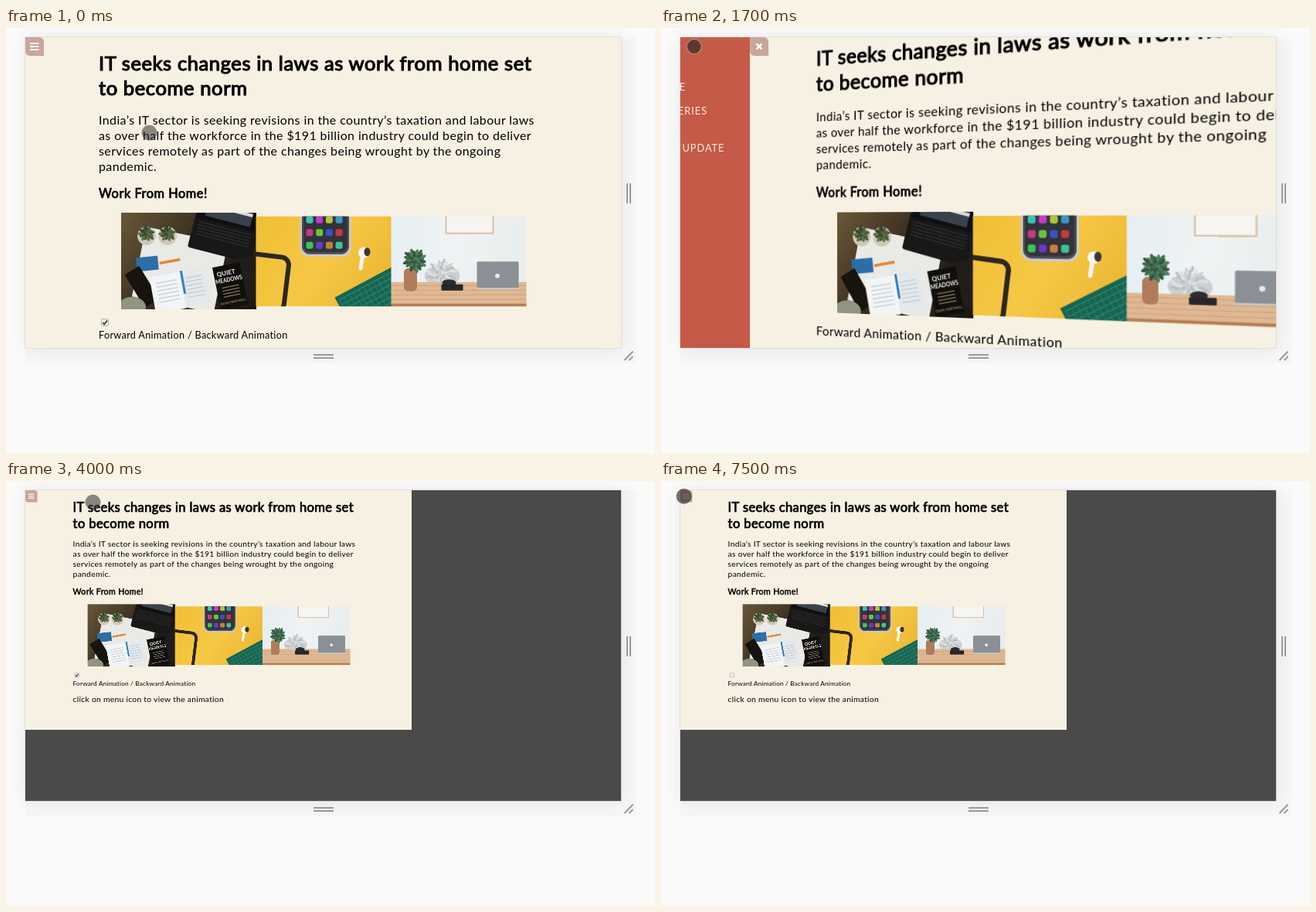
An HTML page with a canvas for the animation above (8 s loop, 840 by 550 pixels).

```html
<!DOCTYPE html>
<html lang="en">
<head>
<meta charset="utf-8">
<title>Page tilt menu</title>
<style>
html, body { margin: 0; width: 100%; height: 100%; overflow: hidden; background: #fafafa; }
body { font-family: Lato, sans-serif; color: #000; }
#stage { position: relative; width: 840px; height: 550px; overflow: hidden; background: #fafafa; }
#stage div, #stage p, #stage canvas, #stage svg { position: absolute; margin: 0; }
#tray { left: 25px; top: 12px; width: 791px; height: 422px; background: #f6f6f6; }
#view, #shade { left: 25px; top: 12px; width: 771px; height: 402px; overflow: hidden; }
#shade { box-shadow: 0 0 0 .6px #d4d4d4, 0 0 22px rgba(0,0,0,.08); }
#zoom { left: 0; top: 0; width: 771px; height: 478px; transform-origin: 0 0; perspective: 783px; perspective-origin: 50% 50%; }
#page { left: 0; top: 0; width: 771px; height: 478px; background: #f7f1e3; transform-origin: 0 50%; }
#page p { left: 95px; white-space: nowrap; letter-spacing: .024em; font-size: 16px; line-height: 20px; }
#page .bold { -webkit-text-stroke: .045em #000; }
#page .title { top: 17px; font-size: 25.6px; line-height: 32px; letter-spacing: .022em; }
#page .text { top: 97px; line-height: 19.9px; }
#page .sub { top: 192px; font-size: 16.4px; letter-spacing: .032em; }
#photos { left: 123.5px; top: 226.5px; width: 525px; height: 125px; }
#box { left: 97.5px; top: 364px; width: 8px; height: 8px; border: 1px solid #b4b4b4; border-radius: 2px; background: #e9eaec; }
#box svg, #btn svg { left: 0; top: 0; }
#menu { left: -157px; top: 0; width: 157px; height: 478px; background: #c45a47; color: #f8ece6; }
#menu p { left: 24px; font-size: 12.8px; line-height: 16px; letter-spacing: .95px; white-space: nowrap; }
#menu p + p { margin-top: 15.5px; }
#menu nav { position: absolute; top: 24px; }
#menu nav p { position: relative; }
#btn { left: 0; top: 0; width: 23.5px; height: 23.5px; background: #caa59a; border-radius: 0 6px 0 6px; }
#dot { left: -10px; top: -10px; width: 20px; height: 20px; box-sizing: border-box; border-radius: 50%; }
</style>
</head>
<body>
<div id="stage">
  <div id="tray"></div>
  <div id="shade"></div>
  <div id="view">
    <div id="zoom">
      <div id="page">
        <p class="title bold">IT seeks changes in laws as work from home set<br>to become norm</p>
        <p class="text">India’s IT sector is seeking revisions in the country’s taxation and labour laws<br>as over half the workforce in the $191 billion industry could begin to deliver<br>services remotely as part of the changes being wrought by the ongoing<br>pandemic.</p>
        <p class="sub bold">Work From Home!</p>
        <canvas id="photos" width="1050" height="250"></canvas>
        <div id="box"><svg width="8" height="8"><path id="tick" d="M1.2 4.2 3.2 6.4 7 1.4" fill="none" stroke="#333" stroke-width="1.7"/></svg></div>
        <p id="label">Forward Animation / Backward Animation</p>
        <p id="hint">click on menu icon to view the animation</p>
      </div>
      <div id="menu"><nav><p>HOME</p><p>OFFICE</p><p>GROCERIES<br>SHOP</p><p>NEWS UPDATE</p></nav></div>
      <div id="btn"><svg width="24" height="24" fill="none" stroke="#fff">
        <path id="bars" d="M6 8H17.5M6 12H17.5M6 16H17.5" stroke-width="1.8"/>
        <path id="cross" d="M8.4 8.4 15.4 15.4M15.4 8.4 8.4 15.4" stroke-width="2.4"/>
      </svg></div>
    </div>
  </div>
  <svg width="840" height="550" fill="none" stroke="#999" stroke-width="2">
    <path d="M804 201V227M808 201V227M398 423H424M398 427H424M800.5 430 811.5 418.5M806.5 430 811.5 425"/>
  </svg>
  <div id="dot"></div>
</div>
<script>
const $ = id => document.getElementById(id);
const g = $('photos').getContext('2d');
const photoW = 175, photoH = 116.5;

// run a drawing in a moved and turned frame
function at(x, y, turn, draw) {
  g.save();
  g.translate(x, y);
  g.rotate(turn);
  draw();
  g.restore();
}
function rect(color, x, y, w, h, r = 0) {
  g.fillStyle = color;
  g.beginPath();
  g.roundRect(x, y, w, h, r);
  g.fill();
}
// rectangle given by its centre
function slab(color, x, y, w, h, turn = 0, r = 0) {
  at(x, y, turn, () => rect(color, -w / 2, -h / 2, w, h, r));
}
function oval(color, x, y, rx, ry = rx, turn = 0) {
  g.fillStyle = color;
  g.beginPath();
  g.ellipse(x, y, rx, ry, turn, 0, 7);
  g.fill();
}
function fade(w, h, ...colors) {
  const f = g.createLinearGradient(0, 0, w, h);
  colors.forEach((c, i) => f.addColorStop(i / (colors.length - 1), c));
  return f;
}
function rows(color, n, x, y, w, step) {
  for (let i = 0; i < n; i++) rect(color, x, y + i * step, w, 1);
}
// tuft of leaves on a sunflower spiral
function tuft(x, y, n, size, spread, hue, sat, light) {
  for (let i = 0; i < n; i++) {
    const a = i * 2.4, r = spread * Math.sqrt(i / n);
    oval(`hsl(${hue},${sat}%,${light + i % 3 * 7}%)`, x + r * Math.cos(a), y + r * Math.sin(a), size, size / 2, a);
  }
}
function photo(x, y, h, draw) {
  g.save();
  g.beginPath();
  g.rect(x, y, photoW, h);
  g.clip();
  at(x, y, 0, draw);
  g.restore();
}

function desk() {
  rect(fade(photoW, 125, '#6a5838', '#33291c', '#1c1713'), 0, 0, photoW, 125);
  slab('#e9e9e6', 76, 74, 108, 92, .2);
  for (const x of [33, 60]) {
    oval('#cfc8b8', x, 30, 12);
    tuft(x, 27, 18, 4, 8, 90, 22, 22);
  }
  at(130, 33, .25, () => {
    rect('#181818', -40, -24, 84, 46, 3);
    rect('#0f1013', -38, -48, 84, 30);
    rect('#39424a', -28, -45, 60, 22);
    rect('#d8dce0', -28, -40, 60, 4);
    rows('#353535', 5, -34, -14, 70, 4);
  });
  slab('#2c6fa6', 34, 66, 28, 18, -.1);
  slab('#e8842c', 63, 63, 27, 3.5, -.18);
  slab('#17130f', 27, 96, 22, 50, -.55);
  oval('#8f9580', 14, 122, 18, 13);
  at(80, 99, -.18, () => {
    rect('#f2f4f5', -40, -23, 40, 48);
    rect('#e4e8eb', 0, -23, 32, 46);
    rows('#b9c5d1', 6, -33, -14, 27, 5);
    rows('#b9c5d1', 6, 5, -14, 22, 5);
  });
  slab('#2a83c4', 80, 90, 3, 30, -.18);
  slab('#211d1a', 160, 86, 30, 56, -.15);
  at(141, 94, -.2, () => {
    rect('#100f0e', -18, -27, 36, 56);
    g.fillStyle = '#f4f2ec';
    g.textAlign = 'center';
    g.font = 'bold 8px Lato, sans-serif';
    g.fillText('QUIET', -2, -14);
    g.fillText('MEADOWS', 0, -5, 35);
    rows('#a08c62', 4, -11, 1, 22, 4);
    g.font = 'bold 4px Lato, sans-serif';
    g.fillText('OLIVE HARTWELL', 0, 23);
  });
}

function gadgets() {
  rect(fade(photoW, photoH, '#f0bf35', '#f7c845', '#e7b330'), 0, 0, photoW, photoH);
  rect('#c9cbd0', 57, -20, 66, 72, 12);
  rect('#4b4c50', 59.5, -20, 61, 69, 10);
  rect('#33323a', 62, -20, 56, 66, 8);
  for (let i = 0; i < 12; i++) {
    const row = Math.floor(i / 4);
    rect(`hsl(${130 * (i - 7)},55%,50%)`, 65 + i % 4 * 12.7, row * 16.5, 9, 9, 2.4);
  }
  at(16, 82, .12, () => {
    g.strokeStyle = '#2a2622';
    g.lineWidth = 6;
    g.beginPath();
    g.roundRect(-38, -31, 62, 70, 10);
    g.stroke();
  });
  slab('#f6f4f0', 137, 57, 5, 26, .15, 2.5);
  oval('#f6f4f0', 139.5, 47, 7);
  oval('#3a3634', 144, 46, 4, 5.5);
  at(102, 105, -.49, () => {
    rect('#146652', 0, 0, 100, 60);
    rows('#3b8672', 8, 4, 5, 96, 7);
    for (let x = 4; x < 100; x += 7) rect('#3b8672', x, 5, .6, 55);
  });
}

function table() {
  rect(fade(photoW, 30, '#e6eff2', '#f0f3f4', '#e9edee'), 0, 0, photoW, photoH);
  rect('#d9c3a6', 70, -5, 63, 28);
  rect('#f6f5f2', 72, -5, 59, 26);
  oval('#cdd1d3', 66, 77, 23, 14);
  tuft(66, 76, 60, 3, 19, 200, 4, 74);
  rect('#dfb893', 0, 85, photoW, 32);
  rows('#d0a47c', 5, 0, 89, photoW, 6);
  rect('#b57f55', 0, 113, photoW, 4);
  rect('#b07c5c', 16.5, 67, 17, 30, 6);
  tuft(31, 57, 34, 4, 13, 140, 25, 26);
  oval('#2c2d30', 75, 86, 9, 4.5);
  rect('#26272a', 65, 88, 28, 8, 1);
  rect('#8b9096', 111, 58.5, 54, 35, 2);
  rect('#c9ccd0', 110, 92.5, 55, 2);
  oval('#e8eaec', 137.5, 77, 3);
}

function drawPhotos() {
  g.scale(2, 2);
  photo(0, 0, 125, desk);
  photo(174.5, 4.7, photoH, gadgets);
  photo(349.5, 4.7, photoH, table);
}

const clamp = u => Math.min(1, Math.max(0, u));
const smooth = u => u * u * (3 - 2 * u);

// CSS "ease" curve
function ease(x) {
  const bez = (s, a, b) => 3 * s * (1 - s) ** 2 * a + 3 * s * s * (1 - s) * b + s ** 3;
  let lo = 0, hi = 1;
  for (let i = 0; i < 24; i++) {
    const mid = (lo + hi) / 2;
    if (bez(mid, .25, .25) < x) lo = mid; else hi = mid;
  }
  return bez(lo, .1, 1);
}

// pointer moves; bow bends the way sideways
const moves = [
  { from: 0, to: 100, x: 160.5, y: 111.5 },
  { from: 200, to: 900, x: 38.5, y: 24 },
  { from: 1625, to: 2400, x: 205, y: 27.5 },
  { from: 3900, to: 4000, x: 112.5, y: 27.5 },
  { from: 4100, to: 4500, x: 31, y: 24 },
  { from: 4800, to: 5600, x: 87.5, y: 249.5, bow: 60 },
  { from: 6800, to: 6900, x: 30.5, y: 24.5 },
  { from: 7400, to: 7500, x: 29.7, y: 19.7 }
];
function pointer(t) {
  let x = 185.5, y = 135.5;
  for (const m of moves) {
    const s = smooth(clamp((t - m.from) / (m.to - m.from)));
    x += (m.x - x) * s + (m.bow || 0) * Math.sin(Math.PI * s);
    y += (m.y - y) * s;
  }
  return [x, y];
}
const within = (t, a, b) => t >= a && t < b;

function render(t) {
  const open = within(t, 1600, 4000), small = t >= 4000;
  const p = open ? ease(clamp((t - 1585) / 346)) : 0;
  const slide = p ? `translateX(${157 * p}px)` : 'none';
  $('zoom').style.transform = small ? 'scale(.6485)' : 'none';
  $('view').style.background = small ? '#4a4a4a' : '#f7f1e3';
  $('page').style.transform = p ? `${slide} rotateY(${-25 * p}deg)` : 'none';
  $('menu').style.transform = $('btn').style.transform = slide;
  const show = (id, on) => $(id).style.display = on ? '' : 'none';
  show('menu', open);
  show('cross', open);
  show('bars', !open);
  show('box', !open);
  show('tick', t < 6900);
  $('label').style.top = (open ? 365 : 374.7) + 'px';
  $('label').style.fontSize = open ? '16px' : '12.7px';
  $('hint').style.top = (open ? 396.5 : 406) + 'px';

  const [x, y] = pointer(t), dot = $('dot').style;
  const click = within(t, 1600, 1900), ring = click || within(t, 6100, 6900);
  dot.transform = `translate(${x}px, ${y}px)`;
  dot.background = click || t >= 7500 ? 'rgba(40,36,34,.64)' : 'rgba(50,50,50,.56)';
  dot.border = ring ? '1.5px solid rgba(255,255,255,.5)' : 'none';
}

drawPhotos();
const start = performance.now();
function tick() {
  const t = (performance.now() - start) % 8000;
  render(Math.floor(t / 100) * 100);
  requestAnimationFrame(tick);
}
tick();
</script>
</body>
</html>
```
